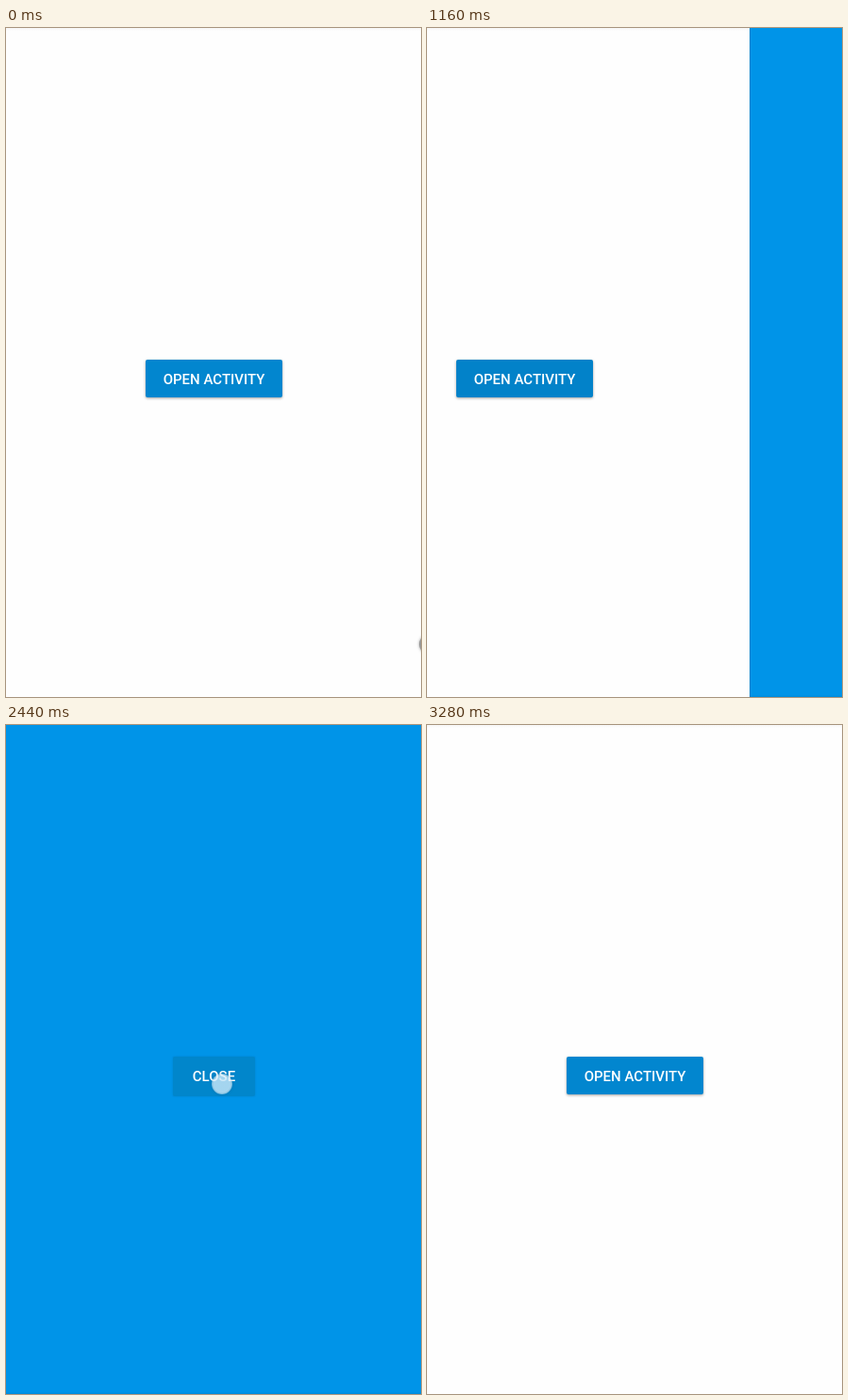
An HTML page for the animation above (3320 ms loop, 440x710 px).

```html
<!DOCTYPE html>
<html lang="en">
<head>
<meta charset="utf-8">
<style>
html, body { margin: 0; width: 100%; height: 100%; overflow: hidden; background: #fefefe; }
#stage { position: relative; width: 440px; height: 710px; overflow: hidden; }
/* The screen is wider than the stage and cropped by 19px on both sides. */
.page { position: absolute; left: -19px; top: 0; width: 478px; height: 710px; }
#home { background: linear-gradient(#f6f6f6, #fefefe 3px); }
#next {
  background: linear-gradient(#0094e8 708px, #0089d8);
  box-shadow: inset 1px 0 rgba(0, 0, 0, .12);
}
.button {
  position: absolute; top: 352px; box-sizing: border-box; padding-top: 1px;
  border-radius: 2px; text-align: center; white-space: nowrap;
  font: 500 15px/40px Roboto, sans-serif; color: #fff;
}
#open {
  left: 167px; width: 145px; height: 40px; background: #0286cf;
  box-shadow: 0 1px 3px rgba(0, 0, 0, .38);
}
#close {
  left: 196px; width: 87px; height: 42px; background: #0186cb;
  box-shadow: 0 0 2px rgba(0, 80, 130, .3);
}
.dot { position: absolute; width: 22px; height: 22px; margin: -11px; border-radius: 50%; }
#touch {
  background: radial-gradient(circle, rgba(200, 230, 247, .82) 7px, rgba(225, 240, 250, .75) 9px, rgba(190, 215, 230, .6) 11px);
  box-shadow: 0 0 3px rgba(0, 50, 90, .25);
}
#leaving { left: 449px; top: 654px; background: #999; box-shadow: 0 0 3px #aaa; }
</style>
</head>
<body>
<div id="stage">
  <div class="page" id="home"><div class="button" id="open">OPEN ACTIVITY</div></div>
  <div class="page" id="next"><div class="button" id="close">CLOSE</div></div>
  <div class="dot" id="touch"></div>
  <div class="dot" id="leaving"></div>
</div>
<script>
const LOOP = 3320, STEP = 40, WIDTH = 478;
const el = id => document.getElementById(id);
const [home, next, open, touch, leaving] = ['home', 'next', 'open', 'touch', 'leaving'].map(el);
const clamp = v => Math.max(0, Math.min(1, v));

// Slide progress as [time, phase] pairs; the phase is then eased with a cosine.
const opening = [[1000, 0], [1120, .25], [1160, .33], [1320, .702], [1440, 1]];
const closing = [[2590, 0], [2880, .579], [2960, .739], [3080, 1]];
const taps = [
  { at: 600, x: 228, y: 384 },
  { at: 2440, x: 229, y: 381 }
];

function slide(keys, t) {
  let phase = t < keys[0][0] ? 0 : 1;
  for (let i = 1; i < keys.length; i++) {
    const [t0, p0] = keys[i - 1], [t1, p1] = keys[i];
    if (t >= t0 && t < t1) phase = p0 + (p1 - p0) * (t - t0) / (t1 - t0);
  }
  return (1 - Math.cos(Math.PI * phase)) / 2;
}

function draw(t) {
  const shift = Math.round(WIDTH * (slide(opening, t) - slide(closing, t)));
  home.style.transform = `translateX(${-shift}px)`;
  next.style.transform = `translateX(${WIDTH - shift}px)`;

  const pressed = t >= 640 && t < 2000;
  open.style.background = pressed ? '#0282c9' : '#0286cf';

  const tap = taps[t < 2000 ? 0 : 1], age = t - tap.at;
  touch.style.left = tap.x + 'px';
  touch.style.top = tap.y + 'px';
  touch.style.opacity = age < 0 ? 0 : clamp((140 - age) / 40);

  leaving.style.opacity = t < STEP ? 1 : 0;
}

// The picture advances in whole steps, like a 25 fps recording.
const start = performance.now();
function tick() {
  const t = (performance.now() - start) % LOOP;
  draw(Math.floor(t / STEP) * STEP);
  requestAnimationFrame(tick);
}
tick();
</script>
</body>
</html>
```
